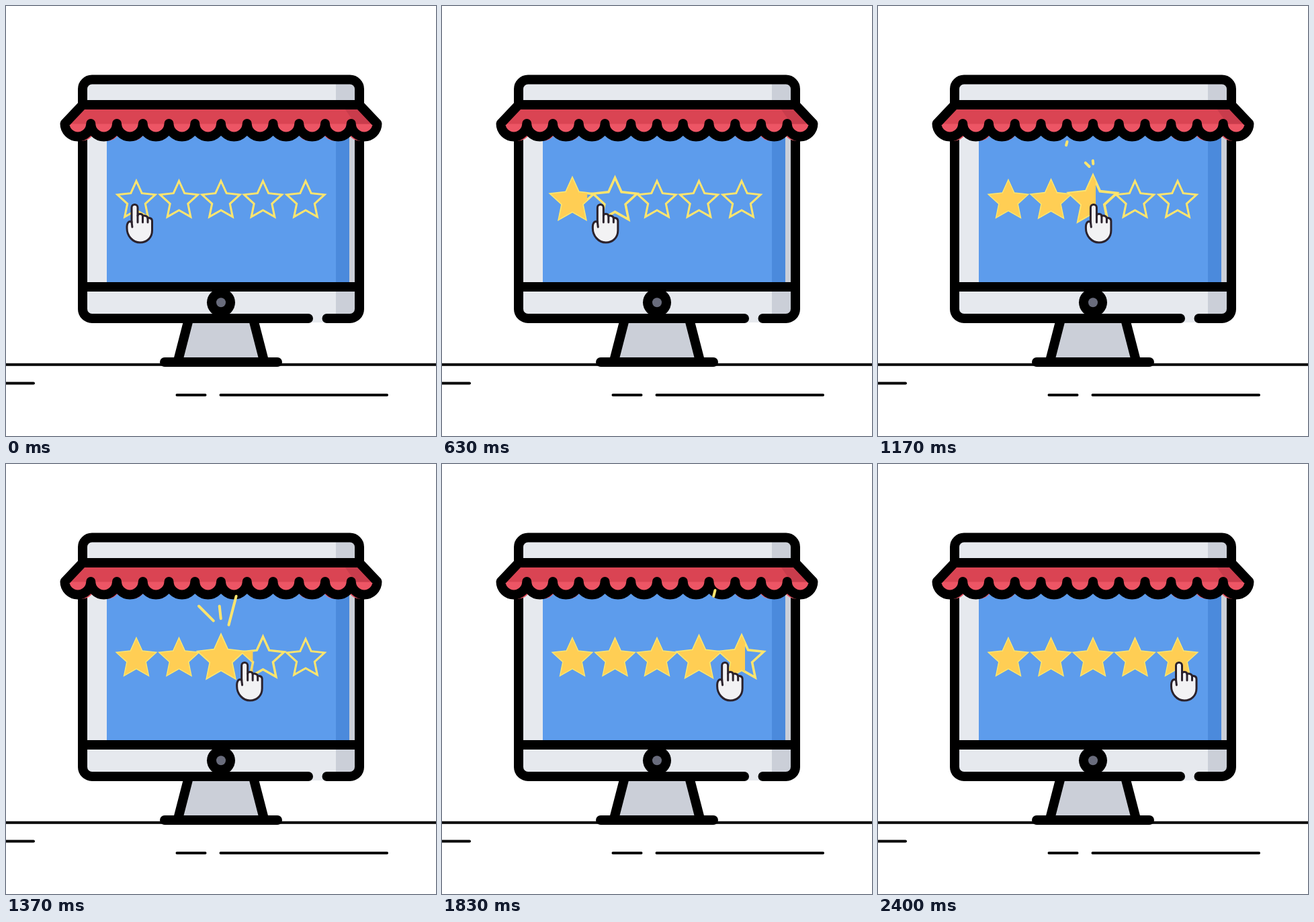
Write an HTML page with a canvas that moves like this. It is 640x640 px and loops after 3.03 s.

```html
<!DOCTYPE html>
<html lang="en">
<head>
<meta charset="utf-8">
<title>Five star shop</title>
<style>
  html, body { margin: 0; width: 100%; height: 100%; overflow: hidden; background: #fff; }
  canvas { display: block; width: 100vw; height: 100vh; }
</style>
</head>
<body>
<canvas id="stage" width="640" height="640"></canvas>
<script>
const ctx = document.getElementById('stage').getContext('2d');
const LOOP = 3030;
const SLIDE = 2320;
const STAR_STEP = 400, STAR_PEAK = 415, STAR_END = 800;
const BURST_UNIT = 200;
const GOLD = '#ffce54', LEMON = '#ffe56e';

// Each star with the place and start of its burst.
const stars = [
  { x: 194, burst: [194, 219], start: 8 },
  { x: 257.5, burst: [257.5, 222], start: 708 },
  { x: 320, burst: [320, 211.5], start: 1108 },
  { x: 382.5, burst: [382.5, 208], start: 1388 },
  { x: 446, burst: [449, 212.5], start: 1888 }
];

// Rays run from the star outwards; delay is in burst units.
const rays = [
  { from: [-5.5, 27.5], to: [-33, 0], delay: 0 },
  { from: [0.3, 23.5], to: [-2.3, 0], delay: 0 },
  { from: [11.5, 28], to: [24, -20], delay: 0.5 }
];

const clamp = v => Math.min(1, Math.max(0, v));
const smooth = v => { const u = clamp(v); return u * u * (3 - 2 * u); };
const sineEase = v => (1 - Math.cos(Math.PI * clamp(v))) / 2;
const mix = (a, b, k) => a + (b - a) * k;

function rect(color, x1, y1, x2, y2) {
  ctx.fillStyle = color;
  ctx.fillRect(x1, y1, x2 - x1, y2 - y1);
}

function shape(color, points) {
  ctx.fillStyle = color;
  ctx.beginPath();
  points.forEach(p => ctx.lineTo(...p));
  ctx.fill();
}

function line(color, width, ...points) {
  ctx.strokeStyle = color;
  ctx.lineWidth = width;
  ctx.beginPath();
  points.forEach(p => ctx.lineTo(...p));
  ctx.stroke();
}

function disc(color, x, y, r) {
  ctx.fillStyle = color;
  ctx.beginPath();
  ctx.arc(x, y, r, 0, 2 * Math.PI);
  ctx.fill();
}

function drawGround() {
  line('#000', 4, [-5, 533.8], [645, 533.8]);
  line('#000', 4, [-5, 561.5], [41, 561.5]);
  line('#000', 4, [254.5, 579], [296.5, 579]);
  line('#000', 4, [319.5, 579], [567, 579]);
}

function drawMonitor() {
  shape('#cbcfd8', [[271, 470], [369, 470], [384, 528], [256, 528]]);
  line('#000', 14, [271, 470], [256, 528]);
  line('#000', 14, [369, 470], [384, 528]);
  line('#000', 14, [236, 530], [404, 530]);

  ctx.fillStyle = '#e6e9ee';
  ctx.beginPath();
  ctx.roundRect(114, 109.5, 412, 361.5, 14);
  ctx.fill();
  rect('#cbcfd8', 491, 112, 522, 459);
  rect('#5d9cec', 150, 160, 491, 415);
  rect('#4b8adc', 491, 160, 511, 415);

  // Frame with a gap in its lower edge.
  ctx.strokeStyle = '#000';
  ctx.lineWidth = 14;
  ctx.beginPath();
  ctx.moveTo(450, 465);
  ctx.arcTo(114, 465, 114, 300, 14);
  ctx.arcTo(114, 109.5, 300, 109.5, 14);
  ctx.arcTo(526, 109.5, 526, 300, 14);
  ctx.arcTo(526, 465, 480, 465, 14);
  ctx.lineTo(477.5, 465);
  ctx.stroke();
  line('#000', 14, [114, 418], [526, 418]);
  disc('#000', 320, 441.3, 21);
  disc('#696c7c', 320, 441.3, 7);
}

function drawAwning() {
  const pitch = 38.75, innerPitch = 37.6;
  for (let i = -5.5; i < 6; i++) disc('#ed5565', 320 + i * innerPitch, 182, innerPitch / 2);
  rect('#ed5565', 95, 174, 545, 184);
  shape('#da4453', [[114, 147], [526, 147], [552, 175.5], [88, 175.5]]);
  shape('#c93c4c', [[500, 147], [526, 147], [552, 175.5], [520, 175.5]]);

  ctx.strokeStyle = '#000';
  ctx.lineWidth = 14;
  ctx.beginPath();
  ctx.moveTo(114, 147);
  ctx.lineTo(526, 147);
  for (let i = 5.5; i > -6; i--) ctx.arc(320 + i * pitch, 175, pitch / 2, 0, Math.PI);
  ctx.closePath();
  ctx.stroke();
}

function starPath(x, scale) {
  ctx.beginPath();
  for (let i = 0; i < 10; i++) {
    const r = (i % 2 ? 14 : 29.5) * scale;
    const a = i * Math.PI / 5;
    ctx.lineTo(x + r * Math.sin(a), 290 - r * Math.cos(a));
  }
  ctx.closePath();
}

function starScale(t, i) {
  const local = t - i * STAR_STEP;
  const grow = local / STAR_PEAK;
  const shrink = (STAR_END - local) / (STAR_END - STAR_PEAK);
  return 1 + 0.3 * clamp(Math.min(grow, shrink));
}

function drawStars(t, progress) {
  ctx.lineJoin = 'miter';
  stars.forEach((star, i) => {
    const scale = starScale(t, i);
    starPath(star.x, scale);
    ctx.strokeStyle = LEMON;
    ctx.lineWidth = 3 * scale;
    ctx.stroke();
  });
  ctx.save();
  ctx.beginPath();
  ctx.rect(100, 220, 60 + 325 * progress, 140);
  ctx.clip();
  ctx.fillStyle = GOLD;
  stars.forEach((star, i) => {
    starPath(star.x, starScale(t, i));
    ctx.fill();
  });
  ctx.restore();
  ctx.lineJoin = 'round';
}

function drawBursts(t) {
  for (const { burst: [x, y], start } of stars) {
    for (const { from, to, delay } of rays) {
      const phase = (t - start) / BURST_UNIT - delay;
      const head = smooth(phase), tail = smooth(phase - 1);
      if (head - tail < 0.005) continue;
      const at = k => [x + mix(from[0], to[0], k), y + mix(from[1], to[1], k)];
      line(LEMON, 4, at(tail), at(head));
    }
  }
}

const handOutline = new Path2D(
  'M-4.5 322V300C-4.5 294 4.5 294 4.5 300V312C5 308.5 12 308.5 12 313' +
  'C12.5 311.5 19 311.5 19.5 316C20 315 26 315 26 320V334C26 345 18 352 8 352' +
  'C-3 352 -11.5 342 -11.5 331C-12 321 -7 319 -4.5 322Z');
const handFolds = new Path2D('M4.5 312V322M12 313V322M19.5 316V322M-4.5 321L-3.6 329');

function drawHand(x) {
  ctx.save();
  ctx.translate(x, 0);
  ctx.fillStyle = '#f2f2f4';
  ctx.strokeStyle = '#2b222c';
  ctx.lineWidth = 3;
  ctx.fill(handOutline);
  ctx.stroke(handOutline);
  ctx.stroke(handFolds);
  ctx.restore();
}

function draw() {
  // The motion advances at 30 steps per second.
  const t = Math.floor((performance.now() % LOOP + 4) * 0.03) / 0.03;
  const progress = sineEase(t / SLIDE);
  rect('#fff', 0, 0, 640, 640);
  ctx.lineCap = ctx.lineJoin = 'round';
  drawGround();
  drawMonitor();
  drawAwning();
  drawStars(t, progress);
  drawBursts(t);
  drawHand(mix(191.5, 448, progress));
  requestAnimationFrame(draw);
}
draw();
</script>
</body>
</html>
```
